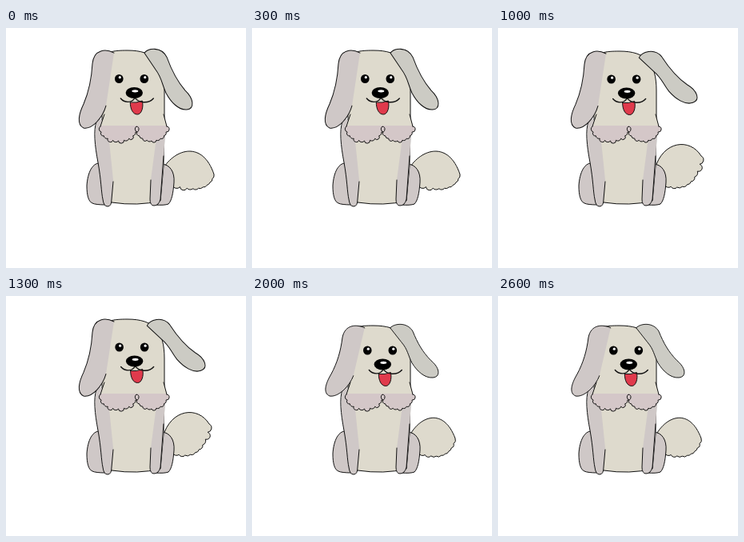
Write an HTML page that moves like this. It is 300 by 300 pixels and loops after 3000 ms.

```html
<!DOCTYPE html>
<html lang="en">
<head>
<meta charset="utf-8">
<title>Dog wagging its tail</title>
<style>
  html, body { margin: 0; width: 100%; height: 100%; overflow: hidden; background: #fff; }
  svg { display: block; width: 100%; height: 100%; }
  .ink { stroke: #111; stroke-width: 1; stroke-linejoin: round; stroke-linecap: round; }
  .line { fill: none; }
  .coat { fill: #dedacd; }
  .shade { fill: #cfc8c7; }
  .grey { fill: #cccbc4; }
  .tuft { fill: #d4c7c8; }
</style>
</head>
<body>
<svg viewBox="0 0 300 300">
  <path id="tail" class="ink coat"/>
  <path class="ink shade" d="M119 169C108 167 102 181 101 197C101 209 103 217 108 219Q112 221 124 221Z"/>
  <path class="ink shade" d="M194 170C205 170 211 180 210 193C209 207 207 216 203 220Q198 222 186 221Z"/>
  <path id="body" class="ink coat"/>
  <path class="shade" d="M116 112C109 122 111 145 115 168C119 190 119 205 121 214Q122 223 127 223Q132 223 132 214L134 190L127 122Z"/>
  <path class="shade" d="M199 122L197 172L193 214Q191 222 185 222Q180 222 180 214L181 190L190 122Z"/>
  <path class="ink line" d="M113 117C109 128 111 147 115 168C119 190 119 205 121 214Q122 223 127 223Q132 223 132 214L134 192M197 160L193 214Q191 222 185 222Q180 222 180 214L181 190"/>
  <path class="coat" d="M123 108L118 122H201L197 108Z"/>
  <path id="tuft" class="tuft"/>
  <path id="fringe" class="ink line"/>
  <path class="ink line" d="M123 108L118 123M197 108L201 123"/>
  <path id="earL" class="ink shade" d="M135 34C125 29 110 29 108 47C107 65 104 80 97 96C91 108 88 121 97 125C108 127 121 112 125 98"/>
  <path id="earR" class="ink grey" d="M173 34C178 28 194 26 201 39C207 55 213 67 224 79C235 89 236 101 226 102C216 103 206 93 200 82C195 72 195 64 187 54Z"/>
  <g id="face">
    <g id="eye"><ellipse cx="-19" cy="-17.5" rx="5.3" ry="5.6"/><circle cx="-18" cy="-19.3" r="1.6" fill="#fff"/></g>
    <use href="#eye" x="31.5"/>
    <path class="ink" fill="#e03a4c" d="M-5 12Q3 13 10 10C12 18 9 27 4 27C-2 27-5 20-5 12Z"/>
    <path class="ink line" style="stroke-width:1.4" d="M-17 7C-12 13-3 13 1 6C5 13 18 14 24 7"/>
    <ellipse rx="10.7" ry="7"/>
    <ellipse cx="1" cy="-2.2" rx="4" ry="1.6" fill="#fff"/>
  </g>
</svg>
<script>
const LOOP = 3000, STEP = 500, REST_TOP = 31;
const el = id => document.getElementById(id);
const set = (id, name, value) => el(id).setAttribute(name, value);

// Small round locks of fur along a curve given by at(u), u from 0 to 1
function fur(at, count, depth, sweep) {
  let d = '';
  for (let i = 1; i <= count; i++) {
    const [x, y] = at(i / count);
    const r = depth + i % 2;
    d += `A${r} ${r} 0 0 ${sweep} ${x} ${y}`;
  }
  return d;
}

const lobe = (cx, rx) => u => [cx - rx * Math.cos(Math.PI * u), 123 + 18 * Math.sin(Math.PI * u) ** 0.8];
const lobes = 'M118 123' + fur(lobe(140.5, 22.5), 10, 3, 0) + fur(lobe(182, 19), 10, 3, 0);
set('tuft', 'd', lobes + 'V122H118Z');
set('fringe', 'd', lobes);

const body = top => `M120 112L118 ${top + 14}C122 ${top + 1} 135 ${top} 152 ${top}` +
  `C185 ${top} 198 ${top + 15} 198 78V122L197 172L193 216Q165 223 132 218L120 200Z`;

// The upper edge bends with the tip, the lower edge is fringed
function tail(x, y) {
  const low = (y - 159) / 24;
  const end = [208, 196], mid = [x - 7, 210];
  const edge = u => [x, y].map((a, k) => a * (1 - u) ** 2 + 2 * mid[k] * u * (1 - u) + end[k] * u * u);
  return `M196 176C${206 + 6 * low} ${140 + 10 * low} ${x - 14} ${y - 22 - 20 * low} ${x} ${y}` +
    fur(edge, 9, 4.5, 1) + 'Z';
}

// Moves an ear's root while its tip stays in place
function pin(tipY, length, dx, dy) {
  const x = dx / length, y = dy / length;
  return `matrix(1 0 ${-x} ${1 - y} ${x * tipY} ${y * tipY})`;
}

const poses = [
  { top: 28, tip: [260, 183], swing: 0 },
  { top: 31, tip: [252, 159], swing: 0 },
  { top: 29, tip: [254, 160], swing: -13 },
  { top: 37, tip: [250, 158], swing: 0 },
  { top: 37, tip: [254, 178], swing: 0 }
];

function draw(t) {
  const { top, tip, swing } = poses[Math.min(poses.length - 1, Math.floor((t % LOOP) / STEP))];
  const drop = top - REST_TOP;
  set('body', 'd', body(top));
  set('tail', 'd', tail(...tip));
  set('earL', 'transform', pin(125, 94, Math.max(0, drop), drop));
  set('earR', 'transform', `translate(${-swing / 4} ${-swing / 4}) rotate(${swing} 181 33) ` + pin(102, 73, 0, drop));
  set('face', 'transform', `translate(${161.3 + drop / 3} ${82.5 + drop / 2})`);
}

const start = performance.now();
function tick() {
  draw(performance.now() - start);
  requestAnimationFrame(tick);
}
tick();
</script>
</body>
</html>
```
